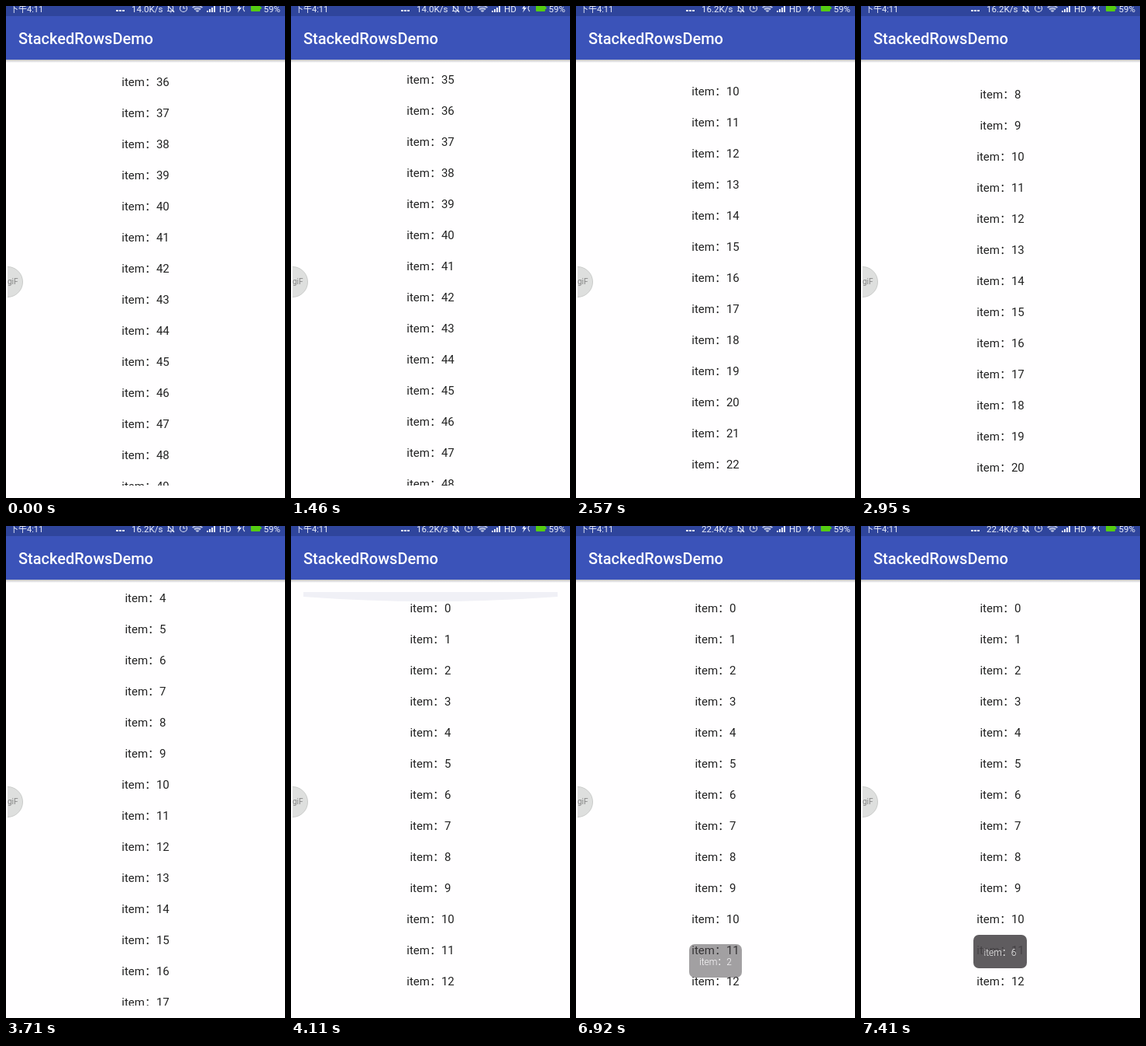
These frames come from a looping animation (360 by 633 pixels, 8.76 s). An HTML page:

```html
<!DOCTYPE html>
<html lang="zh-CN">
<head>
<meta charset="utf-8">
<title>Scrolling list</title>
<style>
  html, body { margin: 0; width: 100%; height: 100%; overflow: hidden; background: #fffeff; }
  svg { display: block; width: 100vw; height: 100vh; }
  text { font-family: Roboto, "Noto Sans CJK SC", "Noto Sans CJK", sans-serif; }
  .row { font-size: 15px; fill: #222; text-anchor: middle; }
  .status { font-size: 11.5px; fill: #eceffa; }
  .line { fill: none; stroke: #dfe4f4; stroke-width: 1.1; }
</style>
</head>
<body>
<svg viewBox="0 0 360 633">
  <defs>
    <clipPath id="listClip"><rect x="16" y="85" width="328" height="532"/></clipPath>
    <clipPath id="buttonClip"><rect x="2" y="330" width="30" height="50"/></clipPath>
    <linearGradient id="shadow" x2="0" y2="1">
      <stop stop-color="#000" stop-opacity=".25"/>
      <stop offset="1" stop-color="#000" stop-opacity="0"/>
    </linearGradient>
  </defs>
  <rect width="360" height="633" fill="#fffeff"/>

  <g clip-path="url(#listClip)">
    <path id="glow" fill="#f0f0f6"/>
    <g id="rows"></g>
  </g>

  <rect y="69" width="360" height="4" fill="url(#shadow)"/>
  <rect width="360" height="69" fill="#3b53b9"/>
  <rect width="360" height="13" fill="#2f459c"/>
  <text x="16" y="49" font-size="20" font-weight="500" fill="#fff">StackedRowsDemo</text>

  <g class="status">
    <text x="5" y="8" font-size="11">下午4:11</text>
    <path d="M142 5h3v2h-3zM146 5h3v2h-3zM150 5h3v2h-3z"/>
    <text id="speed" x="162" y="8"></text>
    <text x="275" y="8">HD</text>
    <text x="332.5" y="8">59%</text>
    <path d="M302 -2l-4 5.5h2.5l-1.5 5 5 -6.5h-2.7z"/>
    <path d="M241 2l6 6.5 6 -6.5q-6 -4 -12 0z" fill-opacity=".35"/>
    <path d="M259 6h2v2h-2zM262 4h2v4h-2zM265 2h2v6h-2zM268 -1h2v9h-2z"/>
  </g>
  <g class="line">
    <path d="M208 6.5h9M209.5 6v-5q3 -4 6 0v5M211.5 8h2M208 -1l9 9"/>
    <circle cx="229" cy="3" r="4.5"/>
    <path d="M229 0v3h2.5M240.5 2q6.5 -5 13 0M243 4.5q4 -3 8 0M245.5 7q1.5 -1.5 3 0"/>
    <path d="M308 -1q-4 4 0 8"/>
  </g>
  <rect x="316" y="-2" width="12" height="9" rx="1" fill="#55cc12"/>
  <rect x="328" y="1" width="1.5" height="3" fill="#55cc12"/>

  <g clip-path="url(#buttonClip)">
    <circle cx="2" cy="355" r="19.5" fill="#dedfde" stroke="#cbcccb"/>
    <text x="2" y="358" font-size="10" fill="#858585">giF</text>
  </g>

  <g id="toast">
    <rect id="toastBox" y="526" height="43" rx="7" fill="#494649" fill-opacity=".88"/>
    <text id="toastText" y="552.5" font-size="12" font-weight="300" fill="#fafafa" text-anchor="middle"></text>
  </g>
</svg>
<script>
const LOOP = 8760;
const ROW_HEIGHT = 40;
const FIRST_BASELINE = 111;
const byId = id => document.getElementById(id);
const [glow, rowLayer, speed, toast, toastBox, toastText] =
  ["glow", "rows", "speed", "toast", "toastBox", "toastText"].map(byId);

const rows = Array.from({ length: 15 }, () => {
  const row = document.createElementNS("http://www.w3.org/2000/svg", "text");
  row.setAttribute("class", "row");
  row.setAttribute("x", 180);
  return rowLayer.appendChild(row);
});

// The screen refreshes in bursts: [first, last, count]
const bursts = [
  [0, 0, 1], [1060, 1460, 5], [1490, 1880, 5], [1980, 2850, 10], [2950, 2950, 1],
  [3410, 4210, 9], [4300, 4300, 1], [4780, 4880, 2], [5040, 5040, 1],
  [5810, 5810, 1], [6820, 7120, 4], [7150, 7250, 2], [7410, 7410, 1]
];
const ticks = bursts.flatMap(([first, last, count]) =>
  Array.from({ length: count }, (_, i) =>
    Math.ceil((first + (last - first) * i / Math.max(1, count - 1)) / 10) * 10));

const lastTick = time => ticks.findLast(tick => tick <= time);

// Linear interpolation through [time, value] points
function along(points, time) {
  if (time <= points[0][0]) return points[0][1];
  for (let i = 1; i < points.length; i++) {
    const [t0, v0] = points[i - 1], [t1, v1] = points[i];
    if (time <= t1) return v0 + (v1 - v0) * (time - t0) / (t1 - t0);
  }
  return points.at(-1)[1];
}

// Slow drag, fling, rest, then a second fling to the top
function scrollAt(t) {
  if (t < 1490) return along([[1000, 1448], [1460, 1411]], t);
  if (t < 1780) return 1411 - 155 * ((t - 1490) / 290) ** 3;
  if (t < 2950) return 312 + 492 * ((2950 - t) / 870) ** 2.2;
  if (t < 3410) return 312;
  if (t < 3910) return 312 * (1 - ((t - 3310) / 600) ** 2);
  return 0;
}

function drawRows(scroll) {
  const first = Math.floor(scroll / ROW_HEIGHT);
  rows.forEach((row, i) => {
    const n = first + i;
    row.textContent = "item：" + n;
    row.setAttribute("y", Math.round(FIRST_BASELINE + n * ROW_HEIGHT - scroll));
  });
}

function drawGlow(t) {
  const depth = along([[3810, 0], [4010, 13], [4110, 12], [4210, 5], [4300, 0]], t);
  const side = 85 + depth * 0.5;
  glow.setAttribute("d", `M16 85H344V${side}Q180 ${side + depth} 16 ${side}Z`);
}

function toastState(t) {
  if (t >= 6820 && t < 7120) {
    return {
      shift: along([[6820, 3], [6920, 12], [7020, 31]], t),
      alpha: along([[6820, 0.9], [7020, 0.25]], t)
    };
  }
  const age = t - (t >= 7150 ? 7150 : 4780);
  if (age < 0 || (t >= 7120 && t < 7150)) return { shift: 0, alpha: 0 };
  return {
    shift: along([[0, 24], [100, -5], [260, 0]], age),
    alpha: along([[0, 0.4], [100, 1]], age)
  };
}

function drawToast(t) {
  const { shift, alpha } = toastState(t);
  const second = t >= 7150;
  const left = second ? 145 : 146;
  toast.setAttribute("opacity", alpha);
  toast.setAttribute("transform", `translate(0 ${shift})`);
  toastBox.setAttribute("x", left);
  toastBox.setAttribute("width", 214 - left);
  toastText.setAttribute("x", (left + 214) / 2);
  toastText.textContent = "item：" + (second ? 6 : 2);
}

function draw(time) {
  const t = lastTick(time % LOOP);
  drawRows(scrollAt(t));
  drawGlow(t);
  drawToast(t);
  speed.textContent = (t < 1680 ? "14.0" : t < 5810 ? "16.2" : "22.4") + "K/s";
}

const start = performance.now();
function frame() {
  draw(performance.now() - start);
  requestAnimationFrame(frame);
}
frame();
</script>
</body>
</html>
```
